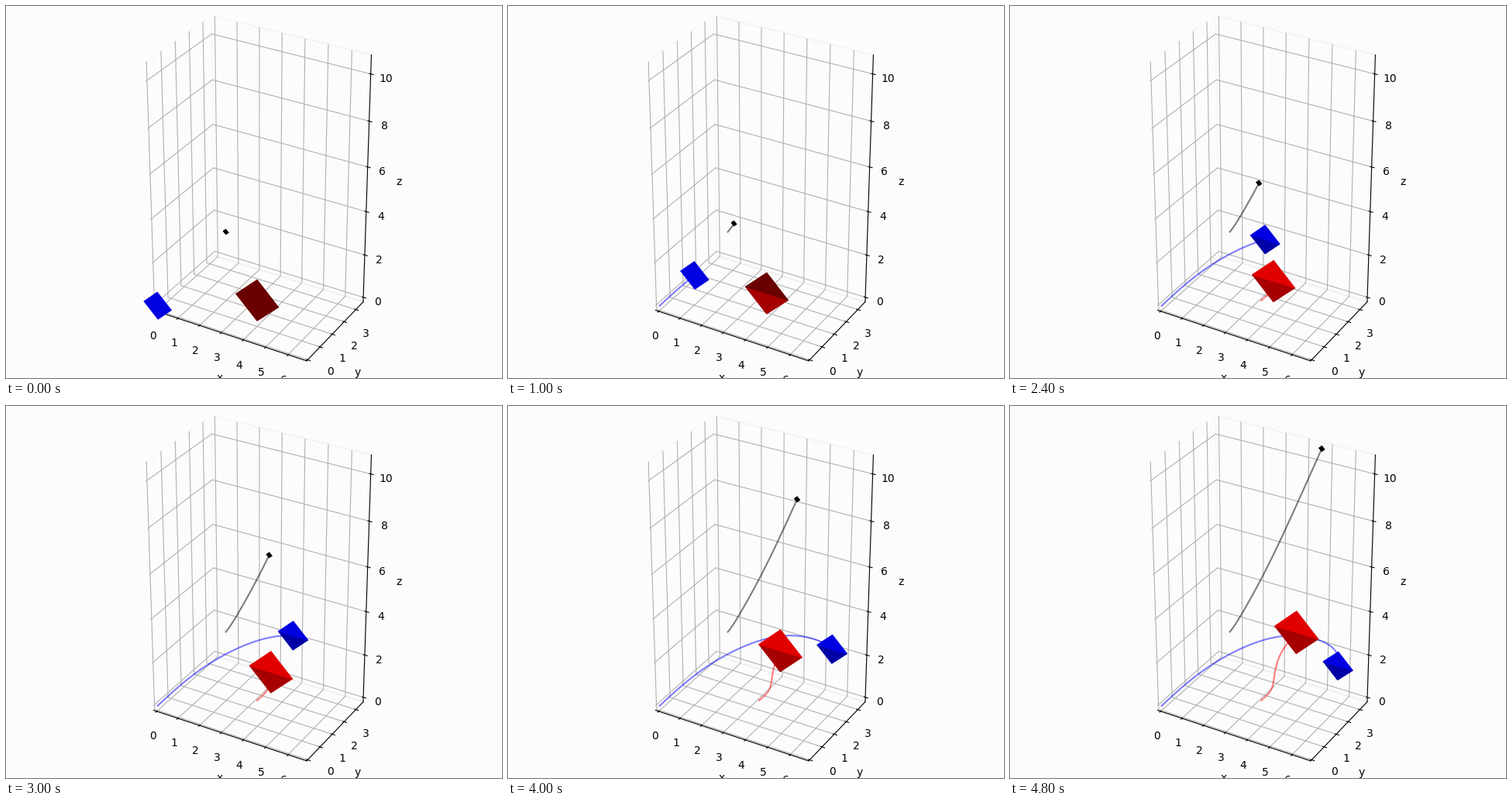
Animation, 640 px wide and 480 px high, one loop 5000 ms. Source, as a matplotlib script:

```python
import matplotlib.pyplot as plt
import numpy as np
from matplotlib.animation import FuncAnimation
from mpl_toolkits.mplot3d.art3d import Poly3DCollection

WIDTH, HEIGHT, DPI = 640, 480, 100
FRAMES, INTERVAL = 25, 200
PAPER = "#fcfcfc"
LIGHT, FLAT, DARK = 0.883, 0.65, 0.417
KNOTS = np.array([0, 7, 14, 20, 24])

fig = plt.figure(figsize=(WIDTH / DPI, HEIGHT / DPI), dpi=DPI, facecolor=PAPER)
ax = fig.add_axes([95 / WIDTH, 15.4 / HEIGHT, 450 / WIDTH, 450 / HEIGHT],
                  projection="3d", facecolor=PAPER)


def setup_axes():
    limits = [(-0.15, 6.816), (-1.08, 3.64), (-0.22, 10.79)]
    ax.set(xlim=limits[0], ylim=limits[1], zlim=limits[2],
           xlabel="x", ylabel="y", zlabel="z")
    ax.set_box_aspect([hi - lo for lo, hi in limits])
    ax.view_init(elev=30, azim=-60)
    ax.set_xticks(range(7))
    ax.set_yticks(range(-1, 4))
    ax.set_zticks(range(0, 11, 2))
    for axis in (ax.xaxis, ax.yaxis, ax.zaxis):
        axis.pane.fill = False


def natural_spline(knots, points):
    """Smooth path through the points, without acceleration at its ends."""
    gap = np.diff(knots)[:, None]
    slope = np.diff(points, axis=0) / gap
    system = np.eye(len(knots))
    bend = np.zeros_like(points)
    for i in range(1, len(knots) - 1):
        left, right = gap[i - 1, 0], gap[i, 0]
        system[i, i - 1:i + 2] = left, 2 * (left + right), right
        bend[i] = 6 * (slope[i] - slope[i - 1])
    bend = np.linalg.solve(system, bend)

    def path(t):
        t = np.atleast_1d(t)
        i = np.clip(np.searchsorted(knots, t, side="right") - 1, 0, len(gap) - 1)
        h = gap[i]
        b = (t - knots[i])[:, None] / h
        a = 1 - b
        curve = (a**3 - a) * bend[i] + (b**3 - b) * bend[i + 1]
        return a * points[i] + b * points[i + 1] + curve * h**2 / 6

    return path


class Body:
    def __init__(self, color, radius, points, shades):
        self.rgb = np.array(color, float)
        self.shades = shades
        self.path = natural_spline(KNOTS, np.array(points, float))
        # A flat diamond in the x-z plane, split into an upper and a lower half.
        left, right = (-radius, 0, 0), (radius, 0, 0)
        self.halves = np.array([[left, right, (0, 0, radius)],
                                [left, right, (0, 0, -radius)]])
        self.trail, = ax.plot([], [], [], color=color, alpha=0.5, lw=1.5)
        self.shape = Poly3DCollection(self.halves, linewidths=1)
        ax.add_collection3d(self.shape)

    def update(self, frame):
        steps = np.linspace(0, frame, 8 * frame + 1)
        track = self.path(steps)
        self.trail.set_data_3d(*track.T)
        self.shape.set_verts(list(self.halves + track[-1]))
        colors = [tuple(self.rgb * shade) for shade in self.shades(frame)]
        self.shape.set_facecolor(colors)
        self.shape.set_edgecolor(colors)


def red_shades(frame):
    return DARK if frame < 7 else LIGHT, DARK if frame < 1 else FLAT


def blue_shades(frame):
    return LIGHT, LIGHT if frame < 7 else FLAT


def black_shades(frame):
    return LIGHT, FLAT


bodies = [
    Body((1, 0, 0), 0.95,
         [(4, 0, 1), (4.27, 0.29, 1.39), (4.26, 0.58, 1.91),
          (4.47, 0.83, 2.98), (4.99, 1, 3.88)], red_shades),
    Body((0, 0, 1), 0.635,
         [(0, -1, 0), (2.05, -0.34, 2.27), (4.95, 0.31, 4.09),
          (6.7, 0.88, 3.72), (6.69, 1.25, 2.76)], blue_shades),
    Body((0, 0, 0), 0.11,
         [(2, 1, 3), (2.22, 1.45, 3.55), (3.06, 2.19, 5.74),
          (3.97, 2.96, 8.5), (4.61, 3.53, 10.56)], black_shades),
]
setup_axes()


def draw(frame):
    for body in bodies:
        body.update(frame)
    return []


animation = FuncAnimation(fig, draw, frames=FRAMES, interval=INTERVAL,
                          repeat=True, repeat_delay=0, blit=False)
plt.show()
```
